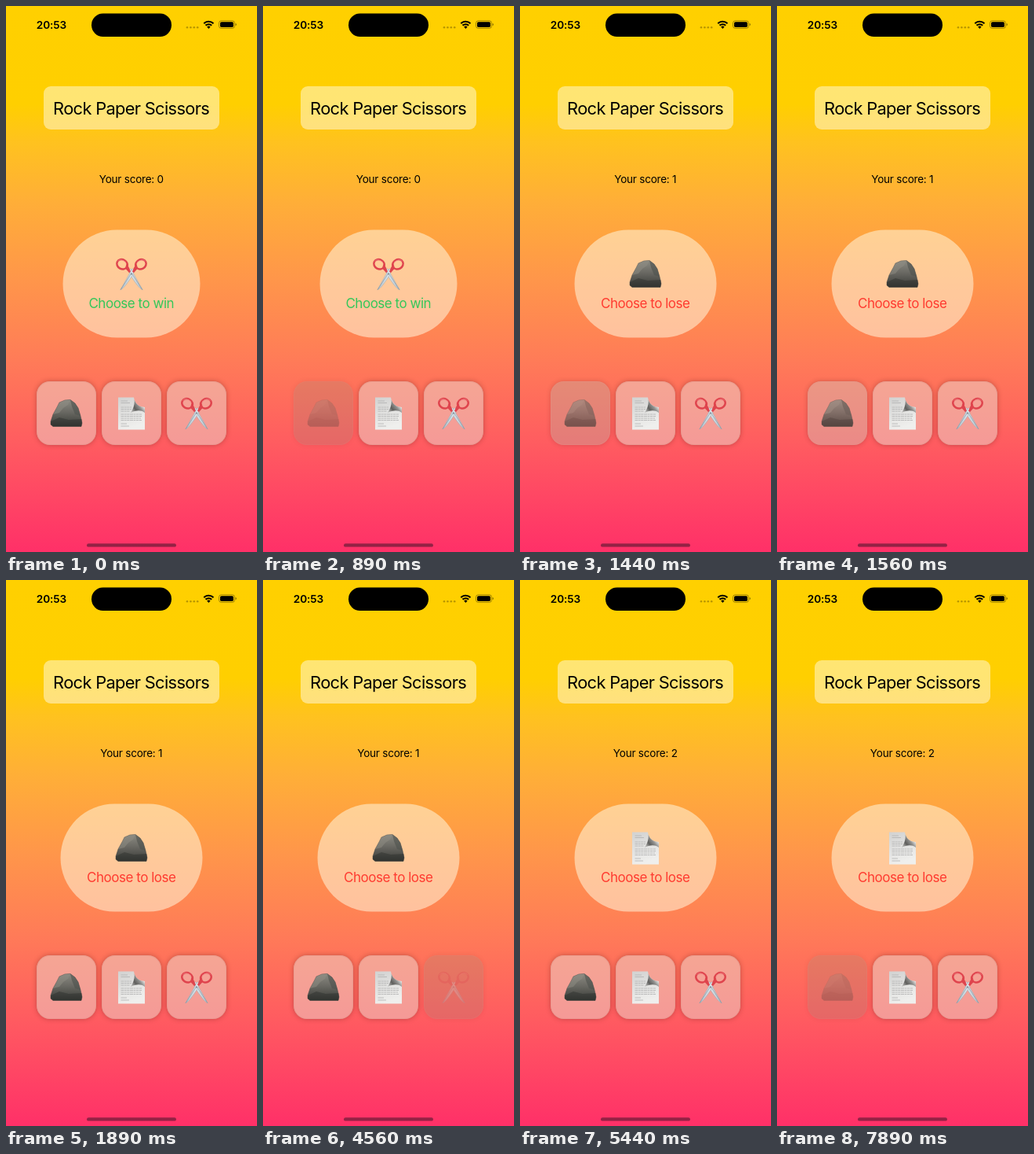
Write an HTML page that moves like this. It is 320x694 px and loops after 8000 ms.

```html
<!DOCTYPE html>
<html lang="en">
<head>
<meta charset="utf-8">
<title>Rock Paper Scissors</title>
<style>
  html, body { margin: 0; width: 100%; height: 100%; overflow: hidden; }
  body {
    position: relative;
    background: linear-gradient(#ffd000 0%, #ffcf00 18%, #ffc21f 25%, #ffae38 36%, #ff964a 50%, #ff7b58 65%, #ff5c60 80%, #ff3068 100%);
  }
  svg { position: absolute; left: 0; top: 0; overflow: visible; }
  text { font-family: Inter, Roboto, sans-serif; font-optical-sizing: none; text-anchor: middle; }
  .title { font-size: 21.8px; letter-spacing: -.03em; }
  .score { font-size: 13.5px; letter-spacing: -.016em; }
  .goal { font-size: 17px; letter-spacing: -.028em; }
  .clock { font-size: 13.6px; font-weight: 600; letter-spacing: -.005em; text-anchor: start; }
  .tile { position: absolute; top: 476.5px; width: 76px; height: 81px; border-radius: 17px; }
  .tile i {
    position: absolute; inset: 0; border-radius: 17px;
    box-shadow: 0 0 6px rgba(90, 25, 20, .36), inset 0 0 0 1px rgba(225, 150, 138, .5);
  }
</style>
</head>
<body>
<svg id="stage" width="320" height="694" viewBox="0 0 320 694">
  <defs>
    <linearGradient id="stone" x2="0" y2="1">
      <stop stop-color="#8b8a82"/><stop offset=".45" stop-color="#6a6963"/><stop offset="1" stop-color="#383a36"/>
    </linearGradient>
    <linearGradient id="sheet" x2=".3" y2="1">
      <stop stop-color="#d2d2d1"/><stop offset="1" stop-color="#efefed"/>
    </linearGradient>
    <linearGradient id="curl" x1=".1" y1=".95" x2=".75" y2=".4">
      <stop stop-color="#b4b4b2"/><stop offset=".35" stop-color="#5e5e5c"/>
      <stop offset=".7" stop-color="#8f8f8d"/><stop offset="1" stop-color="#e0e0de"/>
    </linearGradient>
    <linearGradient id="steel" x2="1" y2="0">
      <stop stop-color="#e6eef2"/><stop offset="1" stop-color="#b4c4cf"/>
    </linearGradient>

    <g id="rock">
      <path d="M-20 10 L-17 1 L-12 -8 L-9 -14 L-2 -17 L5 -17.5 L11 -13 L15 -7 L18 3 L20 12 L19 16.5 L-17 16.5 L-20 14Z"
        fill="url(#stone)" stroke="#4a4b46" stroke-width=".5" stroke-linejoin="round"/>
      <path d="M-12 -8 L-9 -14 L-2 -17 L5 -17.5 L2 -11 L-4 -7 L-9 -1 L-17 1Z" fill="#8f8d84" opacity=".5"/>
      <path d="M5 -17.5 L11 -13 L15 -7 L18 3 L11 1 L7 -9Z" fill="#4f514c" opacity=".6"/>
      <path d="M-20 10 L-9 5 L3 8 L19.5 7 L20 12 L19 16.5 L-17 16.5 L-20 14Z" fill="#262826" opacity=".4"/>
    </g>

    <g id="paper">
      <path d="M-17 -20.5 H3 C4 -13 9 -8 17 -8 V20.5 H-17Z" fill="url(#sheet)"/>
      <path d="M-13.5 -16 H-5 M-13.5 -13.5 H-2" stroke="#b2b2b2" stroke-width=".8"/>
      <path d="M-13.5 -8 H0 M-13.5 -5.5 H0 M-13.5 -3 H-2 M-13.5 1 H13 M-13.5 3.5 H13 M-13.5 6 H12 M-13.5 8.5 H13"
        stroke="#b0b0b0" stroke-width=".8" stroke-dasharray="4 .6 2.5 .6 3.2 .6"/>
      <path d="M-13.5 13 H-6 M-13.5 16 H-3" stroke="#b2b2b2" stroke-width=".8"/>
      <path d="M3 -20.5 C4 -13 9 -8 17 -8 V-1 C12 -5 5 -4 -1 -1 C3 -7 5 -14 3 -20.5Z" fill="url(#curl)"/>
    </g>

    <g id="scissors">
      <g id="half">
        <path d="M-4.5 -6.5 L-1 -7 L14.2 19.8 C10 18 5 11 -1.5 1Z" fill="url(#steel)" stroke="#96a4ae" stroke-width=".5"/>
        <path d="M1 0 L13.8 19.5" stroke="#7f8d97" stroke-width=".6"/>
        <ellipse cx="-11.9" cy="-12.7" rx="7" ry="6" transform="rotate(28 -11.9 -12.7)"
          fill="none" stroke="#df444d" stroke-width="2.5"/>
        <path d="M-6.5 -13 C-3.5 -10.5 -2.5 -7 -1 -3.5 L-2.8 -1.8 L-8 -7.4Z" fill="#df444d"/>
        <path d="M-17.6 -16.4 C-15 -19.5 -10.5 -18.5 -7 -14.8" fill="none" stroke="#f58b8c" stroke-width=".8"/>
      </g>
      <use href="#half" transform="scale(-1 1)"/>
      <circle cy="-.5" r="1.2" fill="#8995a0"/>
    </g>
  </defs>

  <text class="clock" x="38.8" y="29">20:53</text>
  <rect x="109" y="9.5" width="102" height="29.5" rx="14.75"/>
  <g fill="#000" opacity=".28">
    <circle cx="231" cy="27.3" r="1.3"/><circle cx="235.4" cy="27.3" r="1.3"/>
    <circle cx="239.8" cy="27.3" r="1.3"/><circle cx="244.2" cy="27.3" r="1.3"/>
  </g>
  <g fill="none" stroke="#000" stroke-width="2">
    <path d="M252.3 22.2 A8.6 8.6 0 0 1 264.5 22.2"/>
    <path d="M254.6 24.7 A5.4 5.4 0 0 1 262.2 24.7"/>
  </g>
  <path d="M258.4 29 L256.2 26.6 A3.2 3.2 0 0 1 260.6 26.6Z"/>
  <rect x="271.5" y="18.8" width="20" height="9.6" rx="3" fill="none" stroke="#000" stroke-opacity=".4" stroke-width=".9"/>
  <rect x="273" y="20.2" width="17" height="6.8" rx="1.8"/>
  <path d="M292.6 22 Q294 22.4 294 23.6 T292.6 25.2Z" opacity=".45"/>

  <rect x="48" y="102" width="224" height="55" rx="9" fill="#fff" fill-opacity=".45"/>
  <text class="title" x="159.6" y="137.7">Rock Paper Scissors</text>
  <text class="score" id="score" x="159.8" y="225.2"></text>

  <rect id="bubble" y="284.5" height="137" rx="69" ry="68.5" fill="#fffae1" fill-opacity=".53"/>
  <use id="pick" x="160" y="341"/>
  <text class="goal" id="goal" x="159.8" y="384"></text>

  <rect x="103" y="683.2" width="114" height="4.4" rx="2.2" fill="#3c1428" fill-opacity=".55"/>
</svg>

<script>
const LOOP = 8000;
const $ = id => document.getElementById(id);

// start, computer's pick, goal, score
const rounds = [
  [0, 'scissors', 'win', 0],
  [1330, 'rock', 'lose', 1],
  [4890, 'paper', 'lose', 2]
];
const goals = {
  win: { color: '#34c759', width: 175 },
  lose: { color: '#ff3b30', width: 181 }
};

// time, opacity
const fades = {
  rock: [[0, 1], [890, .25], [1000, .2], [1330, .36], [1440, .6], [1560, .8], [1670, .92], [1780, .98], [1890, 1], [7890, .25]],
  paper: [[0, 1]],
  scissors: [[0, 1], [4560, .25], [4670, .2], [4890, .36], [5000, .6], [5110, .8], [5220, .92], [5330, .98], [5440, 1]]
};

const stepAt = (steps, t) => steps.filter(s => s[0] <= t).pop();

const tiles = Object.keys(fades).map((name, i) => {
  const el = document.createElement('div');
  el.className = 'tile';
  el.style.left = 39 + i * 83.2 + 'px';
  el.innerHTML = `<i></i><svg width="76" height="81"><use href="#${name}" x="38" y="41"/></svg>`;
  document.body.append(el);
  return { name, el, edge: el.firstChild, icon: el.lastChild };
});

// The tile material turns darker as it fades.
function material(o) {
  const mix = (a, b) => a + (b - a) * o;
  return `rgba(${mix(110, 235)}, ${mix(120, 215)}, ${mix(100, 205)}, ${.5 * o ** .6})`;
}

function draw(t) {
  const [, pick, goal, score] = stepAt(rounds, t);
  const { color, width } = goals[goal];
  $('score').textContent = 'Your score: ' + score;
  $('goal').textContent = 'Choose to ' + goal;
  $('goal').setAttribute('fill', color);
  $('bubble').setAttribute('x', 160 - width / 2);
  $('bubble').setAttribute('width', width);
  $('pick').setAttribute('href', '#' + pick);

  for (const { name, el, edge, icon } of tiles) {
    const o = stepAt(fades[name], t)[1];
    el.style.background = material(o);
    edge.style.opacity = icon.style.opacity = o;
  }
}

const start = performance.now();
function tick() {
  draw((performance.now() - start) % LOOP);
  requestAnimationFrame(tick);
}
tick();
</script>
</body>
</html>
```
